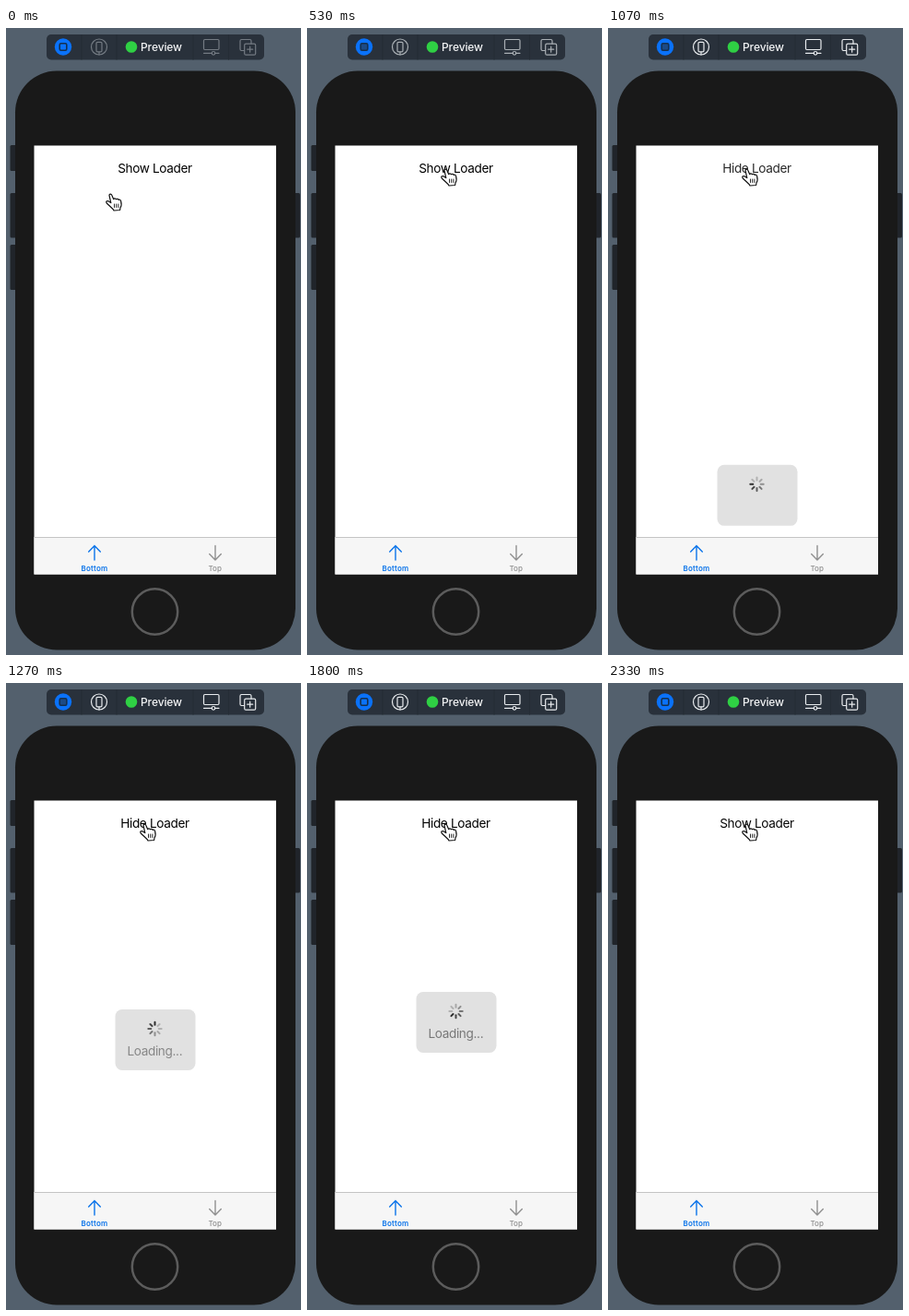
Write an HTML page that moves like this. It is 320 by 680 pixels and loops after 2.39 s.

```html
<!DOCTYPE html>
<html lang="en">
<head>
<meta charset="utf-8">
<title>Loader preview</title>
<style>
  html, body { margin: 0; height: 100%; overflow: hidden; background: #53606d; }
  svg { display: block; width: 320px; height: 680px; font-family: Inter, Roboto, sans-serif; }
  .line { fill: none; stroke-linecap: round; stroke-linejoin: round; }
  .label { font-size: 13.6px; letter-spacing: -.35px; text-anchor: middle; }
  .tab { font-size: 8px; text-anchor: middle; }
</style>
</head>
<body>
<svg viewBox="0 0 320 680">
  <rect width="320" height="680" fill="#53606d"/>

  <!-- toolbar -->
  <rect x="44" y="7" width="236" height="27.5" rx="5" fill="#29313b"/>
  <path d="M82 7v27.500M120 7v27.500M203 7v27.500M241.500 7v27.500" stroke="#252c35"/>
  <circle cx="62" cy="20.500" r="9.200" fill="#0a72fa"/>
  <rect id="stop" x="58.200" y="16.700" width="7.600" height="7.600" rx="1.500" stroke="#14304f" stroke-width="1.600"/>
  <g id="icons" class="line" stroke-width="1.200">
    <circle cx="101" cy="20.500" r="8.500"/>
    <rect x="98" y="15.300" width="6" height="10.500" rx="1.300"/>
    <path d="M101 26v3"/>
    <rect x="214.500" y="12.500" width="16.500" height="11" rx="1.200"/>
    <path d="M214.500 27.300h8.500M227 27.300h4"/>
    <circle cx="225" cy="27.300" r="1.800"/>
    <path d="M258.500 24.500h-3a1.500 1.500 0 0 1-1.500-1.500v-9a1.500 1.500 0 0 1 1.500-1.500h9a1.500 1.500 0 0 1 1.500 1.500v3"/>
    <rect x="258.700" y="17.200" width="12" height="12" rx="1.500"/>
    <path d="M264.700 20.200v6M261.700 23.200h6"/>
  </g>
  <circle cx="136" cy="20.500" r="6.300" fill="#2fd044"/>
  <text x="146" y="25" font-size="12" font-weight="500" letter-spacing="-.1" fill="#f4f5f6">Preview</text>

  <!-- phone -->
  <g fill="#20242a">
    <rect x="4.500" y="127" width="8" height="28" rx="1.500"/>
    <rect x="4.500" y="179" width="8" height="48.500" rx="1.500"/>
    <rect x="4.500" y="235" width="8" height="49" rx="1.500"/>
    <rect x="311" y="179" width="8" height="48.500" rx="1.500"/>
  </g>
  <rect x="10" y="46.500" width="304" height="628" rx="45" fill="#191919"/>
  <circle cx="161.500" cy="633" r="24.700" fill="none" stroke="#5c5c5c" stroke-width="2.500"/>
  <rect x="30.500" y="127.500" width="262.500" height="465" fill="#fff"/>

  <text id="button" class="label" x="161.500" y="157"></text>

  <g id="card">
    <rect x="118.500" width="87" height="66" rx="7.500" fill="#e1e1e1"/>
    <g id="spinner" class="line" transform="translate(161.500 21)" stroke="#222" stroke-width="2"></g>
    <text id="loading" class="label" x="161.300" y="50" fill="#777">Loading...</text>
  </g>

  <!-- tab bar -->
  <rect x="30.500" y="552" width="262.500" height="40.500" fill="#f6f6f6"/>
  <path d="M30.500 552.500h262.500" stroke="#c4c4c4"/>
  <path class="line" d="M96 577v-15.500M89.700 568l6.300-6.500 6.300 6.500" stroke="#0b74ea" stroke-width="1.400"/>
  <path class="line" d="M227 561.500v15.500M220.700 570.500l6.300 6.500 6.300-6.500" stroke="#909090" stroke-width="1.400"/>
  <text class="tab" x="96" y="589.300" font-weight="600" letter-spacing=".2" fill="#0b74ea">Bottom</text>
  <text class="tab" x="226.700" y="589.300" font-weight="500" fill="#8e8e8e">Top</text>

  <g id="hand" class="line" stroke="#111">
    <path fill="#fff" stroke-width="1.200" d="M-1 .5C-1-1.200 1.200-1.400 1.800.3L3.600 4.600C4.200 3.500 6 3.600 6.500 4.800C7.300 3.900 8.700 4.200 9.100 5.400C10 4.800 11.300 5.200 11.600 6.600C12.400 9.400 12.300 12 11 14L10.600 16.500L4 17C3 14.500-.5 12.500-3.800 9C-5 7.400-3.600 6-2 6.800L.8 8.600Z"/>
    <path stroke-width=".9" d="M4.500 10v3.500M6.700 10v3.500M8.900 10v3.500"/>
  </g>
</svg>
<script>
const LOOP = 2390, SHOW = 1000, HIDE = 2130;
const CARD_LOW = 477, CARD_REST = 335;
// Pointer stops: start time, x, y
const STOPS = [[0, 113, 181], [50, 127, 171], [270, 140, 162], [330, 147, 157], [470, 150, 154]];

const $ = id => document.getElementById(id);
const set = (id, attrs) => {
  for (const name in attrs) $(id).setAttribute(name, attrs[name]);
};
const ramp = (t, from, to) => Math.min(1, Math.max(0, (t - from) / (to - from)));
const ease = p => p < .5 ? 4 * p ** 3 : 1 - 4 * (1 - p) ** 3;
const mix = (a, b, p) => a + (b - a) * p;

const SPOKES = 8;
$('spinner').innerHTML = Array.from({ length: SPOKES }, (_, i) =>
  `<path d="M0-4.200V-7.200" transform="rotate(${i * 360 / SPOKES})"/>`).join('');
const spokes = [...$('spinner').children];

function drawButton(t) {
  const shown = t >= SHOW && t < HIDE;
  const press = Math.max(
    ramp(t, 670, 740) * (1 - ramp(t, 930, 1110)),
    ramp(t, 1930, 2000) * (1 - ramp(t, 2060, 2340)));
  $('button').textContent = shown ? 'Hide Loader' : 'Show Loader';
  set('button', { opacity: 1 - .72 * press });
}

function drawCard(t) {
  const visible = t >= SHOW && t < 2330;
  const up = ease(ramp(t, SHOW, 1400)) - ease(ramp(t, HIDE, 2400));
  set('card', {
    visibility: visible ? 'visible' : 'hidden',
    opacity: 1 - ramp(t, HIDE, 2320),
    transform: `translate(0 ${mix(CARD_LOW, CARD_REST, up)})`
  });
  set('loading', { opacity: ramp(t, 1100, 1300) });
  const head = 6 + Math.floor((t - 1070) / 95);
  spokes.forEach((spoke, i) => {
    const age = ((head - i) % SPOKES + SPOKES) % SPOKES;
    spoke.setAttribute('opacity', Math.max(.25, .95 - age * .13));
  });
}

function draw(t) {
  const [, x, y] = STOPS.filter(stop => stop[0] <= t).pop();
  set('hand', { transform: `translate(${x} ${y})` });
  const light = ramp(t, 470, 600);
  set('icons', { stroke: `rgb(${mix(116, 232, light)},${mix(123, 235, light)},${mix(131, 238, light)})` });
  set('stop', { fill: t >= 270 && t < 1300 ? '#1c4a86' : '#0a72fa' });
  drawButton(t);
  drawCard(t);
}

const start = performance.now();
function tick() {
  draw((performance.now() - start) % LOOP);
  requestAnimationFrame(tick);
}
tick();
</script>
</body>
</html>
```
